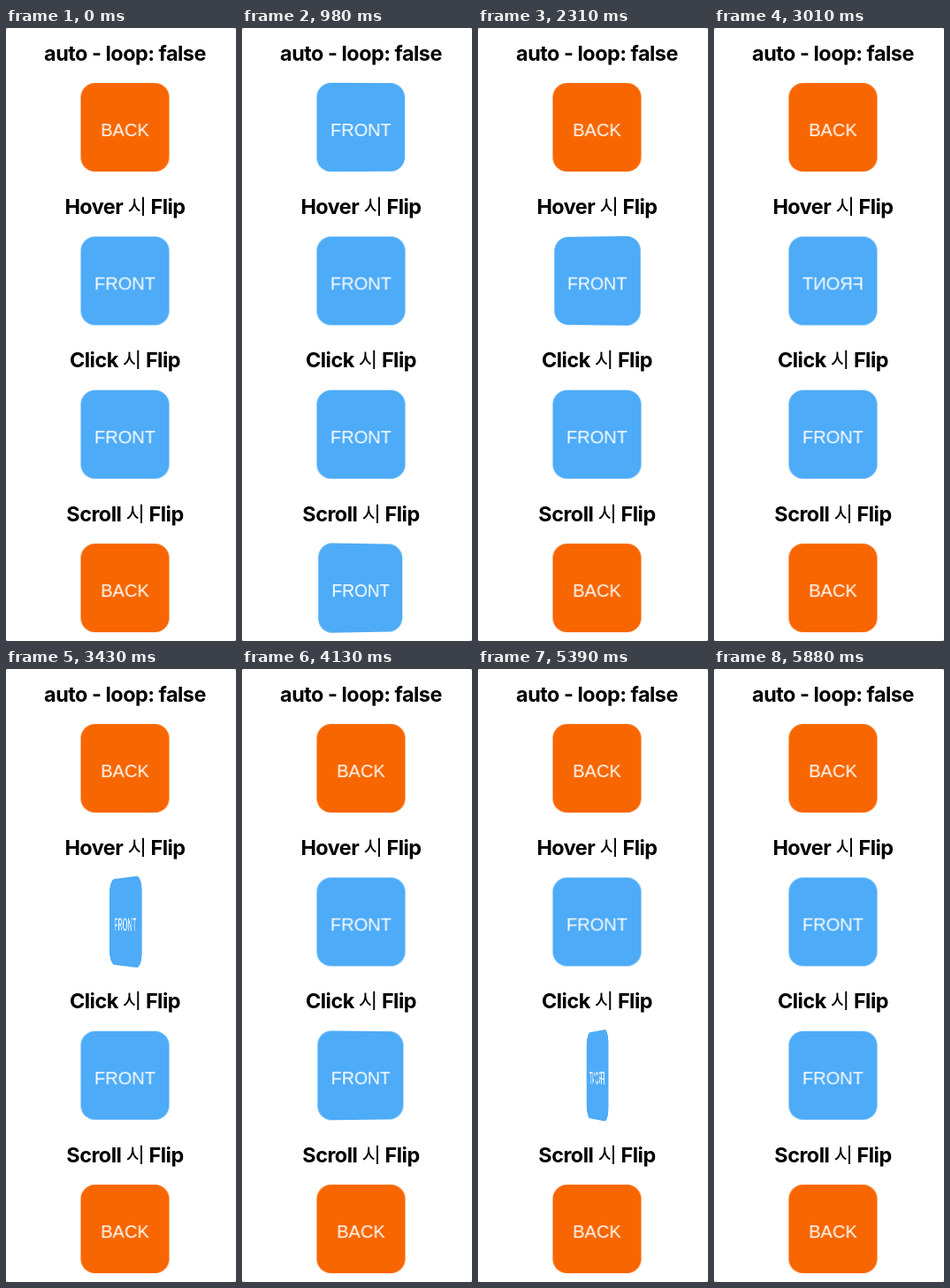
These frames come from a looping animation (260 px wide and 692 px high, 6370 ms). An HTML page:

```html
<!DOCTYPE html>
<html lang="ko">
<head>
<meta charset="utf-8">
<style>
  html, body { margin: 0; width: 100%; height: 100%; overflow: hidden; background: #888; }
  #stage { position: relative; width: 260px; height: 692px; overflow: hidden; background: #fff; border-radius: 2px; }
  h2, .card { position: absolute; left: 0; top: 0; margin: 0; text-align: center; white-space: nowrap; }
  h2 {
    width: 269px; color: #000; letter-spacing: -.5px;
    font: 700 23.4px/30px Inter, "Noto Sans CJK KR", "Noto Sans CJK", sans-serif;
  }
  h2 span { font-weight: 500; }
  .card {
    width: 100px; height: 100px; border-radius: 16px; color: #fff;
    font: 20px/106px "Liberation Sans", Arial, sans-serif;
  }
</style>
</head>
<body>
<div id="stage"></div>
<script>
const LOOP = 6370, RELOAD = 910;

// Each flip: [start, duration, ends on the back?]
const cards = [
  { title: 'auto - loop: false', dir: 1, restsOnBack: true, flips: [[852, 1030, true]] },
  { title: 'Hover <span>시</span> Flip', dir: -1, flips: [[2160, 800, true], [2975, 800, false]] },
  { title: 'Click <span>시</span> Flip', dir: 1, flips: [[3955, 900, true], [4985, 895, false]] },
  { title: 'Scroll <span>시</span> Flip', dir: 1, restsOnBack: true, flips: [[870, 500, true]] }
];

const stage = document.getElementById('stage');

function add(tag, className = '') {
  const el = document.createElement(tag);
  el.className = className;
  return stage.appendChild(el);
}

cards.forEach((card, i) => {
  card.top = 62.1 + i * 520 / 3;
  const heading = add('h2');
  heading.innerHTML = card.title;
  heading.style.top = card.top - 48.6 + 'px';
  card.el = add('div', 'card');
});

// cubic-bezier(.42, 0, .58, 1)
function easeInOut(x) {
  let s = x;
  for (let i = 0; i < 5; i++) {
    s -= (1.26 * s - .78 * s * s + .52 * s ** 3 - x) / (1.26 - 1.56 * s + 1.56 * s * s);
  }
  return s * s * (3 - 2 * s);
}

function pose(card, t) {
  if (t < RELOAD) return { angle: card.restsOnBack ? 180 : 0, toBack: card.restsOnBack };
  const flip = card.flips.filter(([start]) => t >= start).pop();
  if (!flip) return { angle: 0, toBack: false };
  const [start, duration, toBack] = flip;
  const turned = 180 * easeInOut(Math.min(1, (t - start) / duration));
  return { angle: toBack ? turned : 180 - turned, toBack };
}

function draw(now) {
  const t = now % LOOP;
  for (const card of cards) {
    const { angle, toBack } = pose(card, t);
    // The front lies on top while turning back, so it shows mirrored at first.
    const back = toBack && angle > 90;
    const turn = card.dir * angle - (back ? 180 : 0);
    card.el.textContent = back ? 'BACK' : 'FRONT';
    card.el.style.background = back ? '#f76600' : '#4dabf7';
    card.el.style.transform = `translate(84.5px, ${card.top}px) perspective(1000px) rotateY(${turn}deg)`;
  }
  requestAnimationFrame(draw);
}
draw(performance.now());
</script>
</body>
</html>
```
